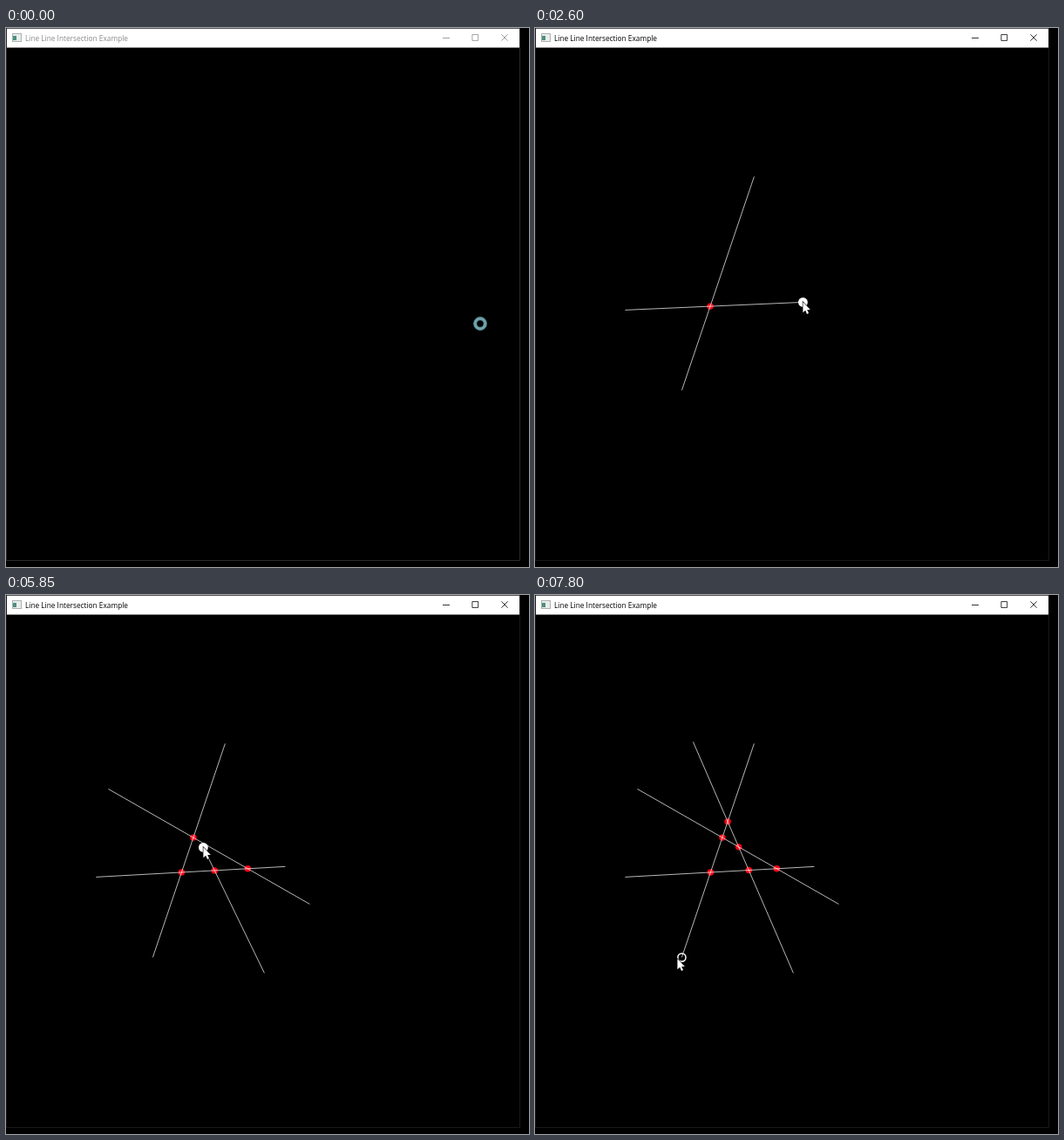
Recreate the animation shown at these times as an HTML page with a canvas. Size 600x618 px, loop 8000 ms.

```html
<!DOCTYPE html>
<html lang="en">
<head>
<meta charset="utf-8">
<title>Line Line Intersection Example</title>
<style>
  html, body { margin: 0; width: 100%; height: 100%; overflow: hidden; background: #000; }
  #stage { position: relative; width: 600px; height: 618px; overflow: hidden; }
  #stage > * { position: absolute; left: 0; top: 0; }
  #frame { width: 588px; height: 610px; border: 1px solid #181818; border-top: 0; }
  #bar { width: 588px; height: 21px; left: 1px; border: solid #555; border-width: 1px 0;
    border-bottom-color: #808080; background: #fff; color: #000; }
  #title { position: absolute; left: 21px; top: 0; white-space: pre;
    font: 8.3px/21px "Open Sans", "Noto Sans", sans-serif; }
  #bar svg { position: absolute; left: -1px; top: -1px; }
  .idle #bar { color: #8a8a8a; }
  .idle #frame { border-color: #2a2a2a; }
</style>
</head>
<body>
<div id="stage" class="idle">
  <div id="frame"></div>
  <div id="bar">
    <svg width="589" height="23" fill="none">
      <rect x="7.5" y="6.5" width="10" height="9" fill="#e9edeb" stroke="#a9b2af"/>
      <rect x="8" y="9" width="4" height="5" fill="#4f8f80"/>
      <path d="M501 11.5h8M534.9 7.6h6.8v6.8h-6.8zM568.3 7.3l7.4 7.4M575.7 7.3l-7.4 7.4"
        stroke="currentColor" stroke-width=".8"/>
    </svg>
    <span id="title">Line Line Intersection Example</span>
  </div>
  <canvas id="view" width="600" height="618"></canvas>
</div>
<script>
const LOOP = 8000, STEP = 50, REACH = 13;
const stage = document.getElementById('stage');
const ctx = document.getElementById('view').getContext('2d');

// Mouse strokes: keys are [time, x, y]; strokes with draw: true leave a line.
const strokes = [
  { keys: [[0, 544, 339], [400, 248, 109]] },
  { keys: [[550, 248, 109], [800, 251, 170]] },
  { draw: true, lag: 50, keys: [[900, 251, 170], [1100, 217, 268], [1150, 210, 293], [1250, 168, 415]] },
  { keys: [[1650, 168, 415], [2150, 103, 323]] },
  { draw: true, keys: [[2300, 103, 323], [2600, 307, 314], [2700, 320, 311]] },
  { keys: [[3100, 320, 311], [3400, 117, 222]] },
  { draw: true, keys: [[3770, 117, 222], [4000, 255, 319], [4500, 348, 354]] },
  { keys: [[4850, 348, 354], [5150, 297, 434]] },
  { keys: [[5300, 297, 434], [5350, 296, 433]] },
  { draw: true, keys: [[5620, 296, 433], [5850, 226, 289], [6450, 181, 168]] },
  { keys: [[6750, 181, 168], [7000, 231, 405], [7150, 234, 444], [7250, 225, 448], [7600, 163, 426]] },
  { keys: [[7600, 163, 426], [7800, 163, 417]] }
];

const slope = (a, b, axis) => (b[axis] - a[axis]) / (b[0] - a[0]);

// Monotone tangent, at rest on both ends of a stroke
function tangent(keys, i, axis) {
  if (i === 0 || i === keys.length - 1) return 0;
  const a = slope(keys[i - 1], keys[i], axis), b = slope(keys[i], keys[i + 1], axis);
  return a * b > 0 ? 2 * a * b / (a + b) : 0;
}

function along(keys, t) {
  const last = keys[keys.length - 1];
  if (t <= keys[0][0]) return keys[0].slice(1);
  if (t >= last[0]) return last.slice(1);
  const i = keys.findIndex(k => k[0] > t) - 1;
  const a = keys[i], b = keys[i + 1], h = b[0] - a[0], u = (t - a[0]) / h;
  const blend = u * u * (3 - 2 * u);
  return [1, 2].map(axis => a[axis] + (b[axis] - a[axis]) * blend
    + h * u * (1 - u) * ((1 - u) * tangent(keys, i, axis) - u * tangent(keys, i + 1, axis)));
}

function cross([p, q], [r, s]) {
  const ax = q[0] - p[0], ay = q[1] - p[1], bx = s[0] - r[0], by = s[1] - r[1];
  const d = ax * by - ay * bx;
  if (!d) return null;
  const u = ((r[0] - p[0]) * by - (r[1] - p[1]) * bx) / d;
  const v = ((r[0] - p[0]) * ay - (r[1] - p[1]) * ax) / d;
  return u >= 0 && u <= 1 && v >= 0 && v <= 1 ? [p[0] + u * ax, p[1] + u * ay] : null;
}

function line([p, q]) {
  ctx.beginPath();
  ctx.moveTo(p[0] + .4, p[1] + .4);
  ctx.lineTo(q[0] + .4, q[1] + .4);
  ctx.lineWidth = .8;
  ctx.strokeStyle = 'rgba(255, 255, 255, .9)';
  ctx.stroke();
}

function disc([x, y], r, color) {
  ctx.beginPath();
  ctx.arc(x + .4, y + .4, r, 0, 2 * Math.PI);
  ctx.fillStyle = color;
  ctx.fill();
}

function ring(x, y, r, width, color) {
  ctx.beginPath();
  ctx.arc(x, y, r, 0, 2 * Math.PI);
  ctx.lineWidth = width;
  ctx.strokeStyle = color;
  ctx.stroke();
}

const arrow = new Path2D('M0 0V12L2.8 9.4 4.6 13.6 6.6 12.7 4.8 8.8H8.5Z');
function pointer([x, y]) {
  ctx.save();
  ctx.translate(x + .4, y + .3);
  ctx.lineWidth = 1.2;
  ctx.strokeStyle = '#000';
  ctx.stroke(arrow);
  ctx.fillStyle = '#fff';
  ctx.fill(arrow);
  ctx.restore();
}

function paint(t) {
  ctx.clearRect(0, 0, 600, 618);
  stage.classList.toggle('idle', t < 950);

  const begun = strokes.filter(s => t > s.keys[0][0]);
  const now = begun[begun.length - 1] || strokes[0];
  const mouse = along(now.keys, t);
  const lines = begun.filter(s => s.draw)
    .map(s => [s.keys[0].slice(1), along(s.keys, t - (s.lag || 0))]);

  lines.forEach((a, i) => lines.slice(0, i).forEach(b => {
    const hit = cross(a, b);
    if (hit) disc(hit, 3.7, '#ff0014');
  }));
  lines.forEach(line);

  if (now.draw) {
    disc(lines[lines.length - 1][1], 5.4, '#fff');
  } else {
    const near = lines.flat().find(p => Math.hypot(p[0] - mouse[0], p[1] - mouse[1]) < REACH);
    if (near) ring(near[0] + .4, near[1] + .6, 4.6, 1.5, '#fff');
  }

  if (t < STEP) {
    ring(544, 339, 5.8, 4.2, '#5b8d97');
    ring(544, 339, 5.8, 2, '#76a5ae');
  } else {
    pointer(mouse);
  }
}

const start = performance.now();
function tick() {
  const t = (performance.now() - start) % LOOP;
  paint(Math.floor(t / STEP) * STEP);
  requestAnimationFrame(tick);
}
tick();
</script>
</body>
</html>
```
